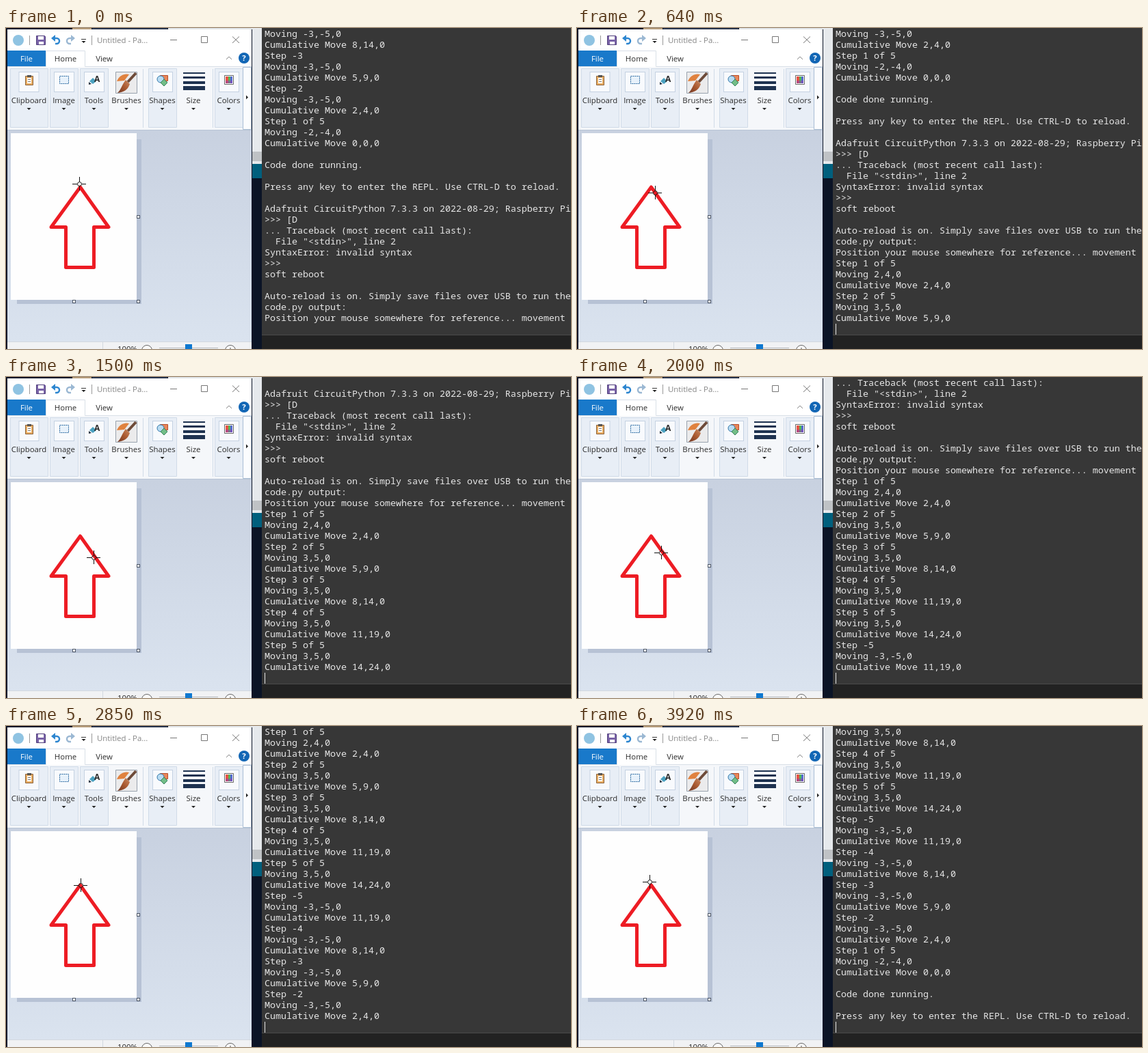
Recreate the animation shown at these times as an HTML page. Size 826 by 470 pixels, loop 4 s.

```html
<!DOCTYPE html>
<html lang="en">
<head>
<meta charset="utf-8">
<title>Mouse steps</title>
<style>
html, body { margin: 0; width: 100%; height: 100%; overflow: hidden; background: #0b1426; }
.stage { position: relative; width: 826px; height: 470px; overflow: hidden; }
.stage > svg { position: absolute; left: 0; top: 0; }
svg text { font: 11.4px "Open Sans", "Noto Sans", sans-serif; fill: #2b2b2b; }
.mid { text-anchor: middle; }

.terminal { position: absolute; left: 374px; top: 0; width: 452px; height: 449px; background: #373737; }
.rows { position: absolute; left: 0; top: 0; width: 452px; height: 432px; overflow: hidden; }
.footer { position: absolute; left: 374px; top: 449px; width: 452px; height: 21px; background: #222; border-top: 1px solid #4a4a4a; box-sizing: border-box; }
pre { position: absolute; left: 4px; top: 0; margin: 0; color: #e6e6e6;
  font: 300 13.333px/16px "Noto Sans Mono", "DejaVu Sans Mono", monospace; }
.caret { position: absolute; left: 4px; top: 433px; width: 1px; height: 16px; background: #e6e6e6; }

pre, .caret, .pointer { animation: 4s step-end infinite; }
pre { animation-name: scroll; }
.caret { animation-name: caret; }
.pointer { animation-name: move; }

@keyframes scroll {
  0% { transform: translateY(0); }
  8.75% { transform: translateY(-48px); }
  16% { transform: translateY(-96px); }
  23% { transform: translateY(-144px); }
  30.25% { transform: translateY(-192px); }
  37.5% { transform: translateY(-240px); }
  44.5% { transform: translateY(-288px); }
  51.75% { transform: translateY(-336px); }
  58.75% { transform: translateY(-384px); }
  66% { transform: translateY(-432px); }
  73% { transform: translateY(-480px); }
  80.25% { transform: translateY(-512px); }
  82%, 100% { transform: translateY(-544px); }
}
@keyframes caret {
  0% { opacity: 0; }
  8.75%, 100% { opacity: 1; }
}
@keyframes move {
  0% { transform: translate(107px, 228px); }
  8.75% { transform: translate(109px, 232px); }
  16% { transform: translate(114px, 241px); }
  23% { transform: translate(118px, 249px); }
  30.25% { transform: translate(123px, 257px); }
  37.5% { transform: translate(128px, 264px); }
  44.5% { transform: translate(123px, 257px); }
  51.75% { transform: translate(118px, 249px); }
  58.75% { transform: translate(114px, 241px); }
  66% { transform: translate(109px, 233px); }
  73%, 100% { transform: translate(106px, 228px); }
}
</style>
</head>
<body>
<div class="stage">
<svg width="826" height="470" viewBox="0 0 826 470">
  <defs>
    <linearGradient id="desk" x1="0" y1="0" x2="0" y2="1">
      <stop offset="0" stop-color="#c8d1e0"/><stop offset="1" stop-color="#dae3ef"/>
    </linearGradient>
    <linearGradient id="brush" x1="1" y1="0" x2="0" y2="1">
      <stop offset="0" stop-color="#c98a63"/><stop offset=".5" stop-color="#a9582f"/><stop offset="1" stop-color="#6b3524"/>
    </linearGradient>
    <path id="drop" d="M-3 0h6l-3 3z" fill="#222"/>
    <rect id="tile" x="-14.5" y="64.5" width="29" height="29" fill="#f8fafd" stroke="#c5d2e2"/>
    <rect id="grip" x="-2" y="-2" width="4" height="4" fill="#fff" stroke="#4c5666"/>
  </defs>

  <!-- desktop behind the windows -->
  <path d="M97 0h28v2h-28z" fill="#b49a78"/>
  <path d="M126 0h110v2h-110z" fill="#25324a"/>
  <path d="M237 0h123v2h-123z" fill="#dfe3e6"/>
  <path d="M360 0h14v181h-14z" fill="#e6e9ec"/>
  <path d="M360 181h14v14h-14z" fill="#bfc2c5"/>
  <path d="M360 195h14v4h-14z" fill="#e6e9ec"/>
  <path d="M360 199h14v21h-14z" fill="#005f7d"/>

  <!-- title bar -->
  <path d="M2 2h357v468h-357z" fill="#fff"/>
  <circle cx="18" cy="18" r="8" fill="#8fc3e2"/>
  <path d="M34.5 11v14M125.5 11v14" stroke="#999"/>
  <path d="M44.5 11.5h12l1 1v12h-13z" fill="#7a63a8" stroke="#51407c"/>
  <path d="M47 12h8v5h-8zM48 20h7v4h-7z" fill="#fff"/>
  <path d="M70 15h4a4 4 0 0 1 0 8h-2" fill="none" stroke="#2d86d0" stroke-width="2.5"/>
  <path d="M66 15l6-5v10z" fill="#2d86d0"/>
  <path d="M97 15h-4a4 4 0 0 0 0 8h2" fill="none" stroke="#9bb8d3" stroke-width="2.5"/>
  <path d="M101 15l-6-5v10z" fill="#9bb8d3"/>
  <path d="M110 16.5h7" stroke="#333"/><use href="#drop" x="113.5" y="19"/>
  <text x="133" y="22" style="fill:#858585">Untitled - Pa...</text>
  <path d="M240 17.5h10M285.500 12.5h9v9h-9zM331 12.5l10 9.5M341 12.5l-10 9.5" fill="none" stroke="#777"/>

  <!-- tabs -->
  <path d="M2 33h56v23h-56z" fill="#1979ca"/>
  <path d="M2 57h357v92h-357z" fill="#f5f7fa"/>
  <path d="M2 56.5h56.500v-23h57v23h243.500" fill="none" stroke="#d9dfe7"/>
  <g class="mid">
    <text x="30" y="49" style="fill:#fff">File</text>
    <text x="87" y="49">Home</text>
    <text x="143.5" y="49">View</text>
  </g>
  <path d="M322 46l4-4 4 4" fill="none" stroke="#888"/>
  <circle cx="348" cy="44" r="8" fill="#1266b5"/>
  <text class="mid" x="348" y="48" style="fill:#fff;font-weight:700">?</text>

  <!-- ribbon -->
  <g fill="#e8eef6" stroke="#d0dbe8">
    <path d="M6.500 59.500h55v86h-55zM64.500 59.500h41v86h-41zM108.500 59.500h41v86h-41zM208.500 59.500h41v86h-41zM305.500 59.500h41v86h-41z"/>
    <path d="M200.500 60v86M302.500 60v86"/>
  </g>
  <use href="#tile" x="33.5"/><use href="#tile" x="85"/><use href="#tile" x="129"/>
  <use href="#tile" x="229"/><use href="#tile" x="326"/>
  <path d="M28.500 70.500h11v13h-11z" fill="#e8ad62" stroke="#8d623a"/>
  <path d="M31 73h6v8h-6z" fill="#fff"/><path d="M31 69h6v3h-6z" fill="#555"/>
  <path d="M32 75.500h4M32 78.500h4" stroke="#777"/>
  <path d="M78.500 70.500h13v11h-13z" fill="#e7f1fb" stroke="#27679f" stroke-dasharray="2 1"/>
  <path d="M122 78l5-5 5 5-5 4z" fill="#4aa1c0"/><path d="M121 79l4 3-4 1z" fill="#26323f"/>
  <text x="129" y="79" style="font-weight:700;font-size:12px">A</text>
  <path d="M160.500 64.500h31v31h-31z" fill="#ebebec" stroke="#98a2ad"/>
  <path d="M162 78c3-8 11-12 18-10l-7 9z" fill="#e0823f"/>
  <path d="M190 66l-12 13" stroke="#6d4a38" stroke-width="4"/>
  <path d="M175 76l6 6c-3 9-9 12-18 13 5-4 7-13 12-19z" fill="url(#brush)"/>
  <path d="M225.500 69.500h11v8h-11z" fill="#e8875a" stroke="#b64b29"/>
  <circle cx="226" cy="75" r="5" fill="#b8dcf3" stroke="#3577a8"/>
  <path d="M231 75l5 5-5 5-5-5z" fill="#72bd88" stroke="#38835d"/>
  <path d="M259 65h32v2h-32zM259 71h32v3h-32zM259 78h32v4h-32zM259 85h32v6h-32z" fill="#1e3250"/>
  <path d="M319.500 69.500h13v13h-13z" fill="#fff" stroke="#666"/>
  <path d="M321 71h4v10h-4z" fill="#e75343"/><path d="M325 71h3v10h-3z" fill="#55b65a"/>
  <path d="M328 71h3v10h-3z" fill="#536bd0"/><path d="M321 77h10v4h-10z" fill="#8d43ad" opacity=".55"/>
  <g class="mid">
    <text x="33.5" y="110">Clipboard</text><text x="84.5" y="110">Image</text>
    <text x="128.5" y="110">Tools</text><text x="176" y="110">Brushes</text>
    <text x="228.5" y="110">Shapes</text><text x="274" y="110">Size</text>
    <text x="325.5" y="110">Colors</text>
  </g>
  <use href="#drop" x="33.5" y="117"/><use href="#drop" x="84.5" y="117"/>
  <use href="#drop" x="128.5" y="117"/><use href="#drop" x="176" y="117"/>
  <use href="#drop" x="228.5" y="117"/><use href="#drop" x="274" y="117"/>
  <use href="#drop" x="325.5" y="117"/>
  <path d="M346.500 57.500h12v91h-12z" fill="#fbfcfe" stroke="#a9bdd4"/>
  <path d="M351 98.500l3 3-3 3z" fill="#222"/>

  <!-- drawing area -->
  <path d="M2 149h357v310h-357z" fill="url(#desk)"/>
  <path d="M2 149.500h357" stroke="#b9c5d5"/>
  <path d="M16 163h182v241h-182z" fill="#b7c2d5"/>
  <path d="M7 154h184v244h-184z" fill="#fefefe"/>
  <use href="#grip" x="193.5" y="276.5"/><use href="#grip" x="99.5" y="400.5"/><use href="#grip" x="193.5" y="400.5"/>
  <path d="M108.500 233l41.500 58.500h-21.500v59h-41v-59h-21.500z" fill="none" stroke="#ed1c24" stroke-width="5" stroke-linejoin="round"/>
  <g class="pointer" fill="none" stroke="#111">
    <path d="M-10 .5h7M4 .5h6M.5 -10v7M.5 4v6"/>
    <circle cx=".5" cy=".5" r="3"/>
  </g>

  <!-- status bar -->
  <path d="M2 459h357v11h-357z" fill="#f1f2f4"/>
  <path d="M2 459.500h357M141.500 460v10" stroke="#d3d8df"/>
  <text x="163" y="474">100%</text>
  <g fill="#fafafa" stroke="#666"><circle cx="206" cy="472" r="7.5"/><circle cx="328" cy="472" r="7.5"/></g>
  <path d="M328 468v8" stroke="#555"/>
  <path d="M224 468.500h86" stroke="#b5b9be"/>
  <path d="M262 463h10v7h-10z" fill="#0f78d0"/>
</svg>

<div class="terminal">
<div class="rows">
<pre>Moving -3,-5,0
Cumulative Move 8,14,0
Step -3
Moving -3,-5,0
Cumulative Move 5,9,0
Step -2
Moving -3,-5,0
Cumulative Move 2,4,0
Step 1 of 5
Moving -2,-4,0
Cumulative Move 0,0,0

Code done running.

Press any key to enter the REPL. Use CTRL-D to reload.

Adafruit CircuitPython 7.3.3 on 2022-08-29; Raspberry Pi
&gt;&gt;&gt; [D
... Traceback (most recent call last):
  File "&lt;stdin&gt;", line 2
SyntaxError: invalid syntax
&gt;&gt;&gt;
soft reboot

Auto-reload is on. Simply save files over USB to run the
code.py output:
Position your mouse somewhere for reference... movement
Step 1 of 5
Moving 2,4,0
Cumulative Move 2,4,0
Step 2 of 5
Moving 3,5,0
Cumulative Move 5,9,0
Step 3 of 5
Moving 3,5,0
Cumulative Move 8,14,0
Step 4 of 5
Moving 3,5,0
Cumulative Move 11,19,0
Step 5 of 5
Moving 3,5,0
Cumulative Move 14,24,0
Step -5
Moving -3,-5,0
Cumulative Move 11,19,0
Step -4
Moving -3,-5,0
Cumulative Move 8,14,0
Step -3
Moving -3,-5,0
Cumulative Move 5,9,0
Step -2
Moving -3,-5,0
Cumulative Move 2,4,0
Step 1 of 5
Moving -2,-4,0
Cumulative Move 0,0,0

Code done running.

Press any key to enter the REPL. Use CTRL-D to reload.
</pre>
</div>
<div class="caret"></div>
</div>
<div class="footer"></div>
</div>
</body>
</html>
```
